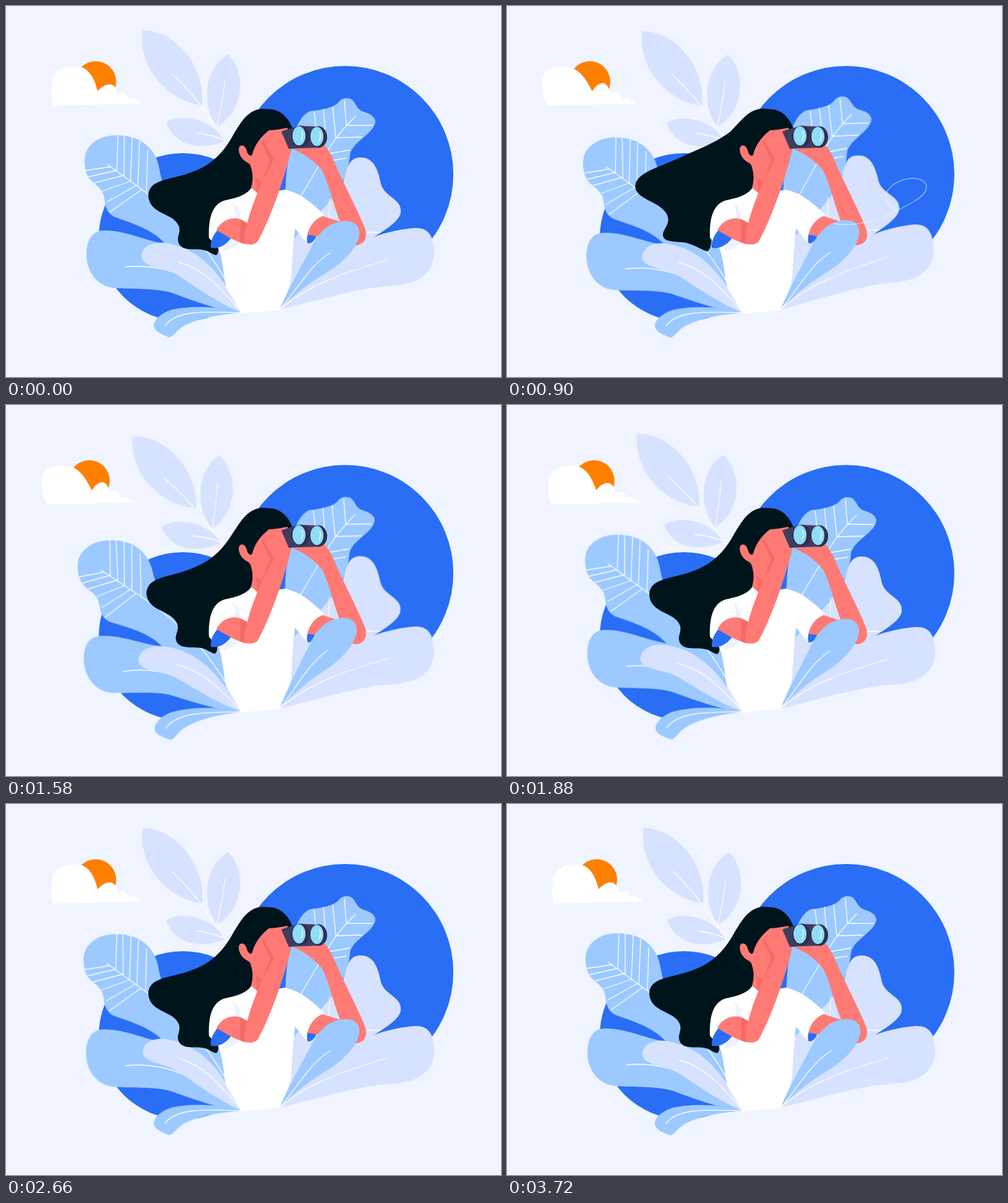
Write an HTML page that moves like this. It is 800x600 px and loops after 3740 ms.

```html
<!DOCTYPE html>
<html lang="en">
<head>
<meta charset="utf-8">
<title>Lookout</title>
<style>
html, body { margin: 0; width: 100%; height: 100%; overflow: hidden; background: #eff4ff; }
svg { display: block; width: 800px; height: 600px; }

.blue { fill: #296ef5; }
.sky { fill: #9cc9ff; }
.mist { fill: #d7e2ff; }
.white { fill: #fff; }
.shade { fill: #edf2fe; }
.skin { fill: #ff7a75; }
.skin2 { fill: #f66a66; }
.vein { fill: none; stroke: #fff; stroke-width: 1.3; stroke-linecap: round; }

.plant, .back, .front, .low, .right, .near, .sun, .cloud, .hair {
  animation: 3740ms ease-in-out infinite;
}
.plant { transform-origin: 420px 329px; animation-name: plant; }
.back, .front, .low { transform-origin: 380px 495px; }
.right, .near { transform-origin: 443px 490px; }
.back { animation-name: back; }
.front { animation-name: front; }
.low { animation-name: low; }
.right { animation-name: right; }
.near { animation-name: near; }
.sun { animation-name: sun; }
.cloud { animation-name: cloud; }
.hair { fill: #00141c; animation-name: hair; }
.wind {
  fill: none; stroke: #fff; stroke-width: 1.4; opacity: .5;
  animation: wind 3740ms linear infinite;
}

@keyframes plant {
  0%, 18.7% { transform: rotate(0deg); }
  40.1% { transform: rotate(-3.4deg); }
  64.2%, 100% { transform: rotate(0deg); }
}
@keyframes back {
  0%, 12% { transform: rotate(0deg); }
  41.2% { transform: rotate(-2.75deg); }
  51.6% { transform: rotate(-.1deg); }
  71.1% { transform: rotate(-.4deg); }
  100% { transform: rotate(0deg); }
}
@keyframes front {
  0%, 18.7% { transform: rotate(0deg); }
  40.1% { transform: rotate(-3.1deg); }
  71.1% { transform: rotate(1.4deg); }
  100% { transform: rotate(0deg); }
}
@keyframes low {
  0%, 18.7% { transform: rotate(0deg); }
  45.4% { transform: rotate(-2.9deg); }
  65.5% { transform: rotate(.15deg); }
  100% { transform: rotate(0deg); }
}
@keyframes right {
  0%, 6.7% { transform: rotate(0deg); }
  25.1% { transform: rotate(-1.5deg); }
  48.1%, 100% { transform: rotate(0deg); }
}
@keyframes near {
  0%, 13.4% { transform: rotate(0deg); }
  38.8% { transform: rotate(-2.05deg); }
  61.5%, 100% { transform: rotate(0deg); }
}
@keyframes sun {
  0% { transform: translateX(0); }
  33.2% { transform: translateX(-13.2px); }
  61.5%, 100% { transform: translateX(0); }
}
@keyframes cloud {
  0%, 61.5%, 100% {
    d: path("M76 161C72 145 72 130 76 116C84 98 110 94 125 100C137 106 144 120 148 138C154 131 162 126 170 127C177 129 180 136 180 146C184 139 194 139 198 149C204 147 209 149 211 153C215 152 218 155 218 158Z");
  }
  33.2% {
    d: path("M64 161C52 142 50 116 59 105C67 95 98 97 109 104C120 111 128 124 136 138C141 129 147 124 153 124C160 126 163 134 164 144C168 135 178 134 185 151C191 147 196 149 198 154C202 152 205 155 205 158Z");
  }
}
@keyframes hair {
  0%, 48.1%, 100% {
    d: path("M425 167C393 161 380 188 368 207C350 241 328 260 294 271C262 282 230 280 230 308C233 334 262 335 274 348C287 362 276 370 278 380C281 396 300 393 316 394C328 395 332 402 340 403C347 396 341 385 336 365L400 310L404 260L440 205L463 198C456 178 440 166 425 167Z");
  }
  25.1% {
    d: path("M425 167C393 161 382 183 360 204C335 222 315 229 284 243C245 262 210 268 207 291C208 312 240 314 255 332C268 348 254 358 252 368C250 384 275 380 290 383C306 388 314 394 324 397C333 390 330 370 330 355L400 310L404 260L440 205L463 198C456 178 440 166 425 167Z");
  }
}
@keyframes wind {
  0%, 10.3% { stroke-dasharray: 0 200; stroke-dashoffset: 0; }
  17.1% { stroke-dasharray: 40 200; stroke-dashoffset: 0; }
  24.1% { stroke-dasharray: 49 200; stroke-dashoffset: -32; }
  27.3% { stroke-dasharray: 45 200; stroke-dashoffset: -55; }
  31.5%, 100% { stroke-dasharray: 0 200; stroke-dashoffset: -100; }
}
</style>
</head>
<body>
<svg viewBox="0 0 800 600">
  <circle class="sun" cx="145" cy="122.300" r="33" fill="#ff7f00"/>
  <path class="cloud white"/>

  <g class="plant">
    <g class="mist">
      <path d="M221 39C275 40 323 98 317 161C258 152 213 98 221 39Z"/>
      <path d="M359 78C388 105 386 170 341 195C315 160 320 100 359 78Z"/>
      <path d="M259 188C280 174 330 180 355 218C322 233 274 231 259 188Z"/>
    </g>
    <path class="vein" d="M268 109Q300 140 316 163L357 222M354 121Q349 160 341 194M308 205Q335 209 355 218"/>
  </g>

  <g class="blue">
    <circle cx="548" cy="272" r="175"/>
    <circle cx="286" cy="374" r="136"/>
  </g>

  <g class="back">
    <path class="sky" d="M127 250C127 222 155 208 180 209C226 210 244 238 248 264C255 300 262 315 290 345C360 370 380 430 380 495C340 450 300 405 258 385C235 360 205 352 175 341C155 330 163 312 155 300C145 283 127 285 127 250Z"/>
    <path class="vein" d="M164 256L228 303C290 350 340 400 380 495M181 209L179 266M191 210L191 275M204 213L201 284M216 219L213 292M229 233L227 302M129 266L169 260M134 276L178 266M143 286L190 274M156 299L202 283M163 317L211 290M168 333L219 297"/>
    <path class="sky" d="M130 402C130 378 140 363 158 363C190 362 220 378 262 386C320 395 360 450 380 496C340 492 300 475 265 463C235 455 195 459 168 455C142 448 130 425 130 402Z"/>
    <path class="vein" d="M193 422C260 415 320 445 380 495"/>
  </g>
  <g class="front">
    <path class="mist" d="M219 402C222 388 238 381 256 383C315 392 345 430 381 496C345 482 300 450 280 437C255 421 216 424 219 402Z"/>
    <path class="vein" d="M278 414C320 425 345 455 380 494"/>
  </g>
  <g class="low">
    <path class="sky" d="M381 496C340 484 295 485 268 491C250 497 238 508 239 518C241 528 255 532 264 536C273 533 275 524 290 516C318 502 350 499 381 496Z"/>
    <path class="vein" d="M257 517C275 492 320 494 380 496"/>
  </g>

  <g class="right">
    <path class="sky" d="M550 149C567 149 562 166 578 171C595 176 602 185 593 197C583 212 560 222 556 240C553 280 530 310 510 340L443 490C445 420 448 340 452 290C455 240 465 180 492 170C512 168 530 164 537 156C541 151 545 149 550 149Z"/>
    <path class="vein" d="M565 178Q535 208 520 234L475 310M547 153L550 193H592M528 163L533 213L575 212M513 167L516 200M498 171L501 200M521 239L555 233M513 252L550 246"/>
    <path class="mist" d="M572 245C597 244 602 270 606 288C612 309 640 312 638 333C637 350 605 366 582 382L445 490L452 390C490 350 530 315 545 285C552 262 553 246 572 245Z"/>
    <path class="vein" d="M575 366H605M523 312L522 342"/>
    <path class="mist" d="M692 398C691 370 682 358 660 359C580 366 520 405 442 491C520 472 570 456 625 452C670 450 692 430 692 398Z"/>
    <path class="vein" d="M616 411C550 430 490 450 443 490"/>
  </g>

  <path class="hair"/>

  <path class="blue" d="M487 368Q484 384 489 384Q498 383 502 371Z"/>
  <path class="skin" d="M463 232C478 236 498 250 511 266C523 290 530 325 540 349L512 340C495 345 488 358 487 370C510 372 540 384 566 387C580 385 584 375 581 362C575 345 555 305 543 280C532 258 528 240 515 226Z"/>
  <path class="white" d="M397 293C390 306 370 311 355 314C332 320 327 345 328 375L344 393C352 420 352 440 356 456L381 497L442 492C452 470 459 455 461 440C462 410 465 380 467 360L487 384C484 365 495 345 515 338C490 315 475 302 450 297C440 300 410 300 397 293Z"/>
  <path class="skin" d="M425 201C410 213 402 225 398 240C396 245 392 241 390 237C388 228 384 224 379 226C374 229 376 240 382 247C388 254 392 252 395 258C399 270 400 280 396 294L407 303C412 297 414 290 418 284L440 260L445 200Z"/>
  <path class="skin2" d="M401 274Q407 281 415 284L408 303L404 300Q408 288 401 274Z"/>

  <path class="shade" d="M364 318C376 322 380 335 379 345L368 344C372 335 370 325 364 318ZM365 373L379 380C372 391 360 396 350 395C348 393 358 388 365 373Z"/>
  <path class="blue" d="M343 361C335 370 330 380 331 391C345 394 358 385 366 372Z"/>
  <path class="skin" d="M426 202L455 197L461 232C455 260 442 300 430 330C420 355 412 372 406 382C400 387 392 386 386 385C370 380 355 372 340 362C350 345 365 341 379 345L390 351C395 330 405 305 414 284C420 272 428 262 432 248L416 220Z"/>
  <path class="skin2" d="M379 345L390 351Q384 368 386 385L378 382Z"/>
  <path class="skin2" d="M415 216L433 248L424 266L414 284L427 249L413 221Z"/>

  <ellipse class="skin" cx="489" cy="197" rx="4" ry="3"/>
  <path fill="#3f3c60" d="M445 203C455 199 468 195 478 194L504 195V229L457 231Z"/>
  <g fill="#322f4e">
    <ellipse cx="476" cy="211" rx="15" ry="17.500"/>
    <ellipse cx="505" cy="212" rx="14" ry="17.500"/>
  </g>
  <g fill="#8fddf7">
    <ellipse cx="473.500" cy="210" rx="10.500" ry="15.500"/>
    <ellipse cx="502.500" cy="211" rx="10.500" ry="15.500"/>
  </g>
  <path class="vein" d="M478 203Q481 210 477 217M507 204Q510 211 506 218"/>

  <g class="near">
    <path class="sky" d="M571 364C569 351 558 347 546 348C522 350 508 364 496 385C475 425 455 460 442 491C475 458 500 442 525 427C550 410 573 385 571 364Z"/>
    <path class="vein" d="M524 399C490 420 470 460 443 490"/>
  </g>

  <path class="wind" pathLength="100" d="M810 371C780 369 700 368 660 350C620 333 606 312 614 300C626 282 650 276 666 280C684 286 682 302 658 316C630 332 600 345 580 350C560 354 540 354 528 352C500 348 470 335 420 325"/>
</svg>
</body>
</html>
```
